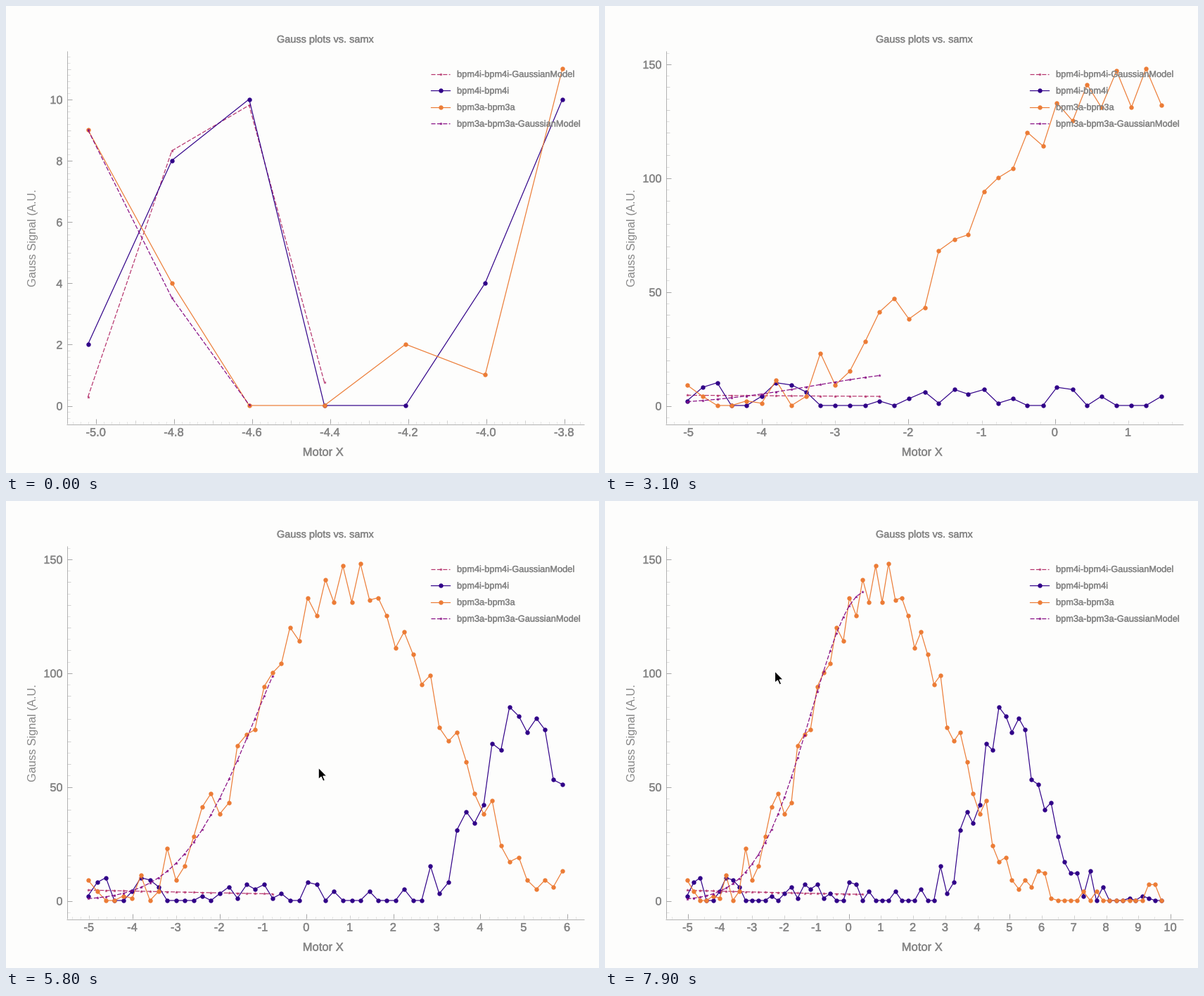
A matplotlib script that plays this animation: 843x664 px, repeating every 8000 ms.

```python
import numpy as np
import matplotlib.pyplot as plt
from matplotlib.animation import FuncAnimation
from matplotlib.collections import LineCollection
from matplotlib.patches import Polygon
from matplotlib.patheffects import withStroke

W, H, DPI = 843, 664, 100
PX = 72 / DPI                      # one pixel in points
FRAMES, STEP = 80, 100

LEFT, RIGHT, TOP, BOTTOM = 86, 822, 64, 594    # plot area
X0, X1, Y0, Y1 = 116.5, 791, 568, 89           # where the data extremes land

GREY, AXIS = "#868686", "#b2b2b2"
INDIGO, ORANGE, PINK, PURPLE = "#300088", "#ec7c36", "#b5326c", "#860a82"

BPM4 = [2, 8, 10, 0, 0, 4, 10, 9, 6, 0, 0, 0, 0, 2, 0, 3, 6, 1, 7, 5, 7, 1, 3,
        0, 0, 8, 7, 0, 4, 0, 0, 0, 4, 0, 0, 0, 5, 0, 0, 15, 3, 8, 31, 39, 34,
        42, 69, 66, 85, 81, 74, 80, 75, 53, 51, 40, 43, 28, 17, 12, 12, 2, 13,
        0, 6, 0, 0, 0, 1, 0, 2, 1, 0, 0]
BPM3 = [9, 4, 0, 0, 2, 1, 11, 0, 4, 23, 9, 15, 28, 41, 47, 38, 43, 68, 73, 75,
        94, 100, 104, 120, 114, 133, 125, 141, 131, 147, 131, 148, 132, 133,
        125, 111, 118, 108, 95, 99, 76, 70, 74, 61, 47, 38, 44, 24, 17, 19, 9,
        5, 9, 6, 13, 12, 1, 0, 0, 0, 0, 4, 0, 4, 0, 0, 0, 0, 0, 0, 0, 7, 7, 0]

# motor readback: even steps plus a small positioning error
ERROR = [0, 13, 9, 0, 6, 8, 4, 13, 9, 4, 4, 0, 7, 0, 2, 0, 14, 3, 17, 0, 13, 5,
         5, 1, 12]
MOTOR = -5.02 + 0.202 * np.arange(74) + np.resize(ERROR, 74) / 1000

TIMES = [0, 1.1, 2.1, 4.1, 5.2, 6.5, 7.9]
COUNT = [7, 16, 25, 41, 50, 62, 74]
# fits: number of points, then the curve's start, middle and end height
FIT4 = np.array([(4, .28, 12.7, .75), (8, 3.3, 5.15, 7.95), (9, 3.9, 5.3, 7.3),
                 (19, 5.2, 3.4, 2.2), (21, 4.4, 3.8, 3.2), (24, 5, 3.5, 2.4),
                 (28, 4.5, 3.5, 2.7)])
FIT3 = np.array([(3, 9, 4, .02), (7, .004, .25, 10.6), (9, 4.6, 3.4, 2.4),
                 (19, .6, 12.3, 72), (21, .8, 16.2, 90.5), (24, .8, 23.4, 117),
                 (28, .7, 34.5, 135.5)])


def count_at(t, counts):
    return int(np.interp(t, TIMES, counts) + 1e-6)


def gauss_fit(t, keys):
    """Gaussian as a parabola in log space through three heights."""
    n = count_at(t, keys[:, 0])
    logs = [np.interp(n, keys[:, 0], np.log(keys[:, k])) for k in (1, 2, 3)]
    x = MOTOR[:n]
    u = (x - x[0]) / (x[-1] - x[0])
    return x, np.exp(np.polyval(np.polyfit([0, .5, 1], logs, 2), u))


def tick_levels(span, min_count):
    """Major, minor and extra tick spacing for an axis span."""
    widest = span / min_count
    unit = 10.0 ** (np.floor(np.log10(widest)) - 1)
    major = next(k for k in (50, 20, 10) if k * unit <= widest * (1 + 1e-9))
    minor = 5 if major == 10 else 10
    extra = {10: 1, 20: 2, 50: 5}[major]
    return [major * unit, minor * unit, extra * unit]


def crowded(shown, fill):
    limits = ((0, .8), (2, .6), (4, .4), (6, .2))
    return any(shown >= n and fill >= limit for n, limit in limits)


def axis_ticks(lo, hi, min_count, length, label_size):
    """Ticks as (value, level) and labels as (value, text)."""
    ticks, labels, size, writing = [], [], 0, True
    for level, gap in enumerate(tick_levels(hi - lo, min_count)):
        places = max(0, int(np.ceil(-np.log10(gap) - 1e-9)))
        new = [k * gap for k in range(int(np.ceil(lo / gap)), int(hi // gap) + 1)
               if all(abs(k * gap - v) > gap * .01 for v, _ in ticks)]
        ticks += [(v, level) for v in new]
        texts = [(v, f"{v + 0.0:.{places}f}") for v in new]
        size += sum(label_size(s) for _, s in texts)
        if level and crowded(len(labels), size / length):
            writing = False
        if writing and level < 2:
            labels += texts
    return ticks, labels


fig = plt.figure(figsize=(W / DPI, H / DPI), dpi=DPI, facecolor="#fdfdfc")
ax = fig.add_axes([0, 0, 1, 1])
ax.set_xlim(0, W)
ax.set_ylim(H, 0)
ax.axis("off")


def text(x, y, s, size, ha="center", **kw):
    return ax.text(x, y, s, fontsize=size * PX, family="Liberation Sans",
                   color=GREY, ha=ha, va="center_baseline",
                   path_effects=[withStroke(linewidth=.3, foreground=GREY)], **kw)


def curve(x, y, color, fit, z):
    style = dict(ls=(0, (5, 2)), marker="*", ms=5 * PX) if fit else \
        dict(ls="-", marker="o", ms=6.4 * PX)
    return ax.plot(x, y, color=color, lw=1.2 * PX, mew=0, zorder=z, **style)[0]


def line(xs, ys, color):
    ax.plot(xs, ys, color=color, lw=PX, solid_capstyle="butt")


line([LEFT + .5, LEFT + .5], [TOP, BOTTOM], AXIS)
line([LEFT, RIGHT], [BOTTOM + .5, BOTTOM + .5], AXIS)
line([0, W], [H - .5, H - .5], "#62627e")
text(454, 46.5, "Gauss plots vs. samx", 14.5)
text(451, 633.5, "Motor X", 16.6)
ax.text(39, 330, "Gauss Signal (A.U.", fontsize=16.2 * PX, color=GREY,
        family="Liberation Sans", ha="center", va="center", rotation=90)

SERIES = [("bpm4i-bpm4i-GaussianModel", PINK, True),
          ("bpm4i-bpm4i", INDIGO, False),
          ("bpm3a-bpm3a", ORANGE, False),
          ("bpm3a-bpm3a-GaussianModel", PURPLE, True)]
curves = []
for row, (name, color, fit) in enumerate(SERIES):
    y = 96.5 + 23.5 * row
    curves.append(curve([], [], color, fit, 3 + row))
    curve([604, 617.5, 631], [y] * 3, color, fit, 10).set_markevery([1])
    text(641, y, name, 12.8, ha="left", zorder=11)

ticks = ax.add_collection(LineCollection([], linewidths=PX, zorder=2))
x_labels = [text(0, 605.5, "", 16.5) for _ in range(24)]
y_labels = [text(80.5, 0, "", 16.2, ha="right") for _ in range(24)]

ARROW = np.array([(0, 0), (0, 16.5), (3.9, 13), (6.6, 19.2), (9.2, 18),
                  (6.6, 12), (11.8, 12)])
cursor = ax.add_patch(Polygon(ARROW, fc="black", ec="white", lw=1.1 * PX, zorder=20))
CURSOR_T = [4.7, 5.2, 6.5, 7.9]
CURSOR_X, CURSOR_Y = [630, 560.5, 308.5, 241.5], [550, 453, 293, 242]


def fill_labels(pool, labels, place):
    for i, label in enumerate(pool):
        if i < len(labels):
            v, s = labels[i]
            label.set_text(s)
            place(label, v)
        else:
            label.set_text("")


def update(frame):
    t = frame * STEP / 1000
    n = count_at(t, COUNT)
    x = MOTOR[:n]
    span, peak = x[-1] - x[0], max(max(BPM4[:n]), max(BPM3[:n]))
    sx, sy = (X1 - X0) / span, (Y0 - Y1) / peak

    def px(v):
        return X0 + (np.asarray(v) - x[0]) * sx

    def py(v):
        return Y0 - np.asarray(v) * sy

    data = [gauss_fit(t, FIT4), (x, BPM4[:n]), (x, BPM3[:n]), gauss_fit(t, FIT3)]
    for c, (vx, vy) in zip(curves, data):
        c.set_data(px(vx), py(vy))

    xt, xl = axis_ticks(x[0] + (LEFT - X0) / sx, x[0] + (RIGHT - X0) / sx, 3.2,
                        RIGHT - LEFT,
                        lambda s: sum(5 if ch in "-." else 9.5 for ch in s))
    yt, yl = axis_ticks((Y0 - BOTTOM) / sy, (Y0 - TOP) / sy, 2.715,
                        BOTTOM - TOP, lambda s: 14.5)
    segments, colors = [], []
    for v, level in xt + yt:
        colors.append((.65, .65, .65, 1 / (level + 1)))
    for v, level in xt:
        p = np.floor(px(v)) + .5
        segments.append([(p, BOTTOM), (p, BOTTOM - 7 / (1 + level / 2))])
    for v, level in yt:
        p = np.floor(py(v)) + .5
        segments.append([(LEFT + 1, p), (LEFT + 1 + 7 / (1 + level / 2), p)])
    ticks.set_segments(segments)
    ticks.set_color(colors)
    fill_labels(x_labels, xl, lambda label, v: label.set_x(px(v)))
    fill_labels(y_labels, yl, lambda label, v: label.set_y(py(v) + .5))

    cursor.set_visible(t >= CURSOR_T[0])
    cursor.set_xy(ARROW + [np.interp(t, CURSOR_T, CURSOR_X),
                           np.interp(t, CURSOR_T, CURSOR_Y)])
    return []


anim = FuncAnimation(fig, update, frames=FRAMES, interval=STEP, repeat=True,
                     repeat_delay=0)
plt.show()
```
